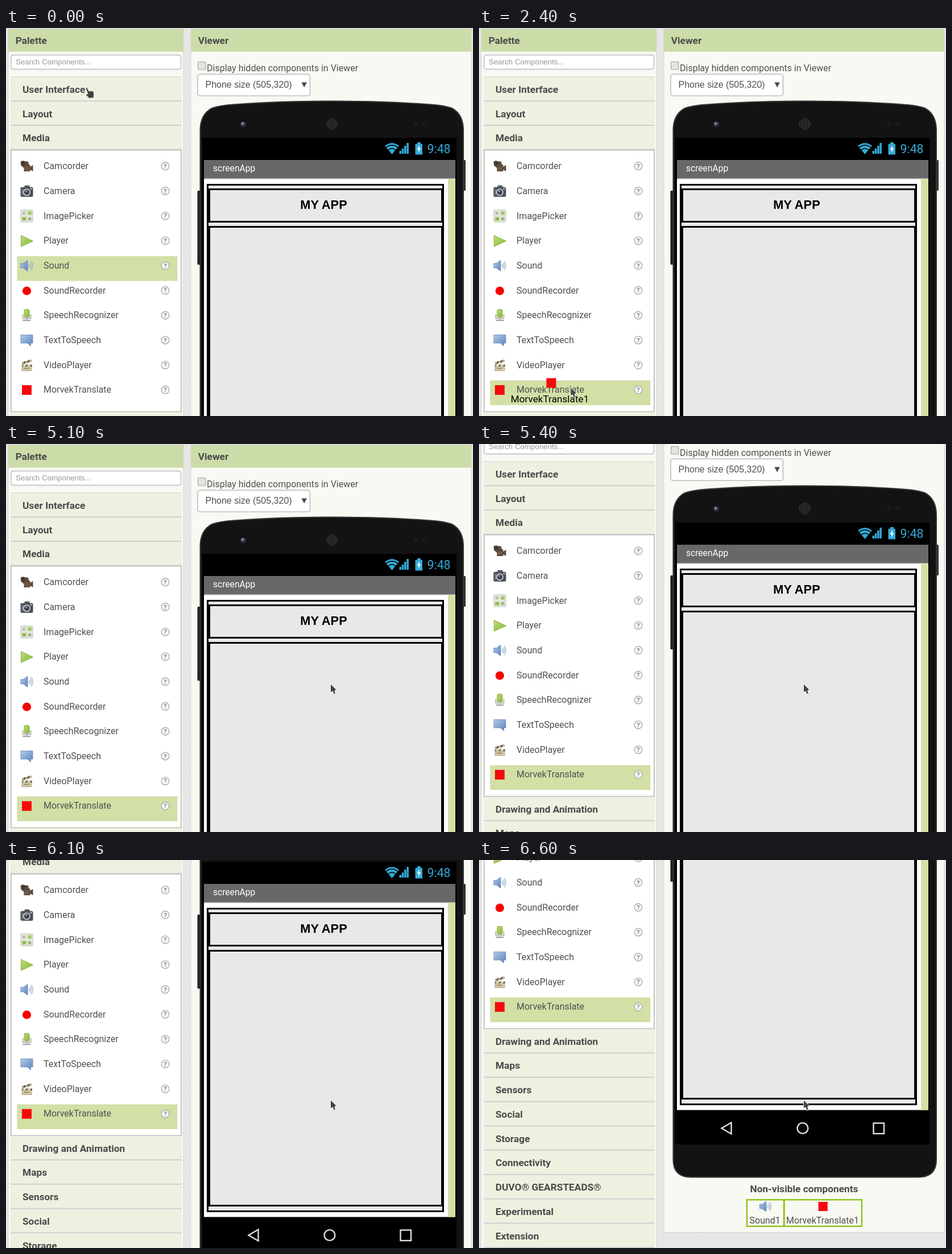
Write an HTML page that moves like this. It is 821 px wide and 682 px high and loops after 8300 ms.

```html
<!DOCTYPE html>
<html lang="en">
<head>
<meta charset="utf-8">
<title>Component palette</title>
<style>
html, body { margin: 0; width: 100%; height: 100%; overflow: hidden; background: #e6e6e6; }
svg { display: block; width: 821px; height: 682px; }
text { font: 16px Roboto, sans-serif; fill: #505050; white-space: pre; }
.bold { font-weight: 700; font-size: 17.3px; fill: #4a4a4a; }
.arial { font-family: "Liberation Sans", Arial, sans-serif; }
.mid { text-anchor: middle; }
</style>
</head>
<body>
<svg id="stage" viewBox="0 0 821 682" xmlns="http://www.w3.org/2000/svg"></svg>
<script>
const LOOP = 8300;
const BRAND = "MorvekTranslate";
const ROW = 43.7, HEAD = 42.75;

const box = (x, y, w, h, fill, more = "") =>
  `<rect x="${x}" y="${y}" width="${w}" height="${h}" fill="${fill}" ${more}/>`;
const path = (d, fill, more = "") => `<path d="${d}" fill="${fill}" ${more}/>`;
const dot = (x, y, r, fill, more = "") => `<circle cx="${x}" cy="${y}" r="${r}" fill="${fill}" ${more}/>`;
const label = (x, y, s, cls = "", style = "") =>
  `<text x="${x}" y="${y}" class="${cls}" style="${style}">${s}</text>`;
const at = (x, y, body, id = "") =>
  `<g ${id && `id="${id}"`} transform="translate(${x} ${y})">${body}</g>`;
const line = (color, width) => `stroke="${color}" stroke-width="${width}"`;

// Icons are centred on 0,0
const icons = {
  Camcorder:
    path("M-11 -8Q-8 -11 -4 -9L3 -8V-4L6 -2V1L11 -2V9L6 6V9H-5V3L-10 -1Z", "#5b4a3d") +
    dot(-6, -5, 3, "#43362c") + box(-4, 1, 8, 6, "#6d5a4a"),
  Camera:
    path("M-5 -7L-3 -10H4L6 -7Z", "#4b5057") + box(-11, -7, 22, 17, "#4a4e54", 'rx="2.5"') +
    box(-9, -4, 3, 11, "#777c82") + dot(0, 2, 6.5, "#c9cdd1") + dot(0, 2, 4.7, "#39424f") +
    dot(-1, 0, 1.8, "#8da3bd") + box(6, -5, 3, 2, "#ddd"),
  ImagePicker:
    box(-10.5, -10.5, 21, 21, "#e3e7dd", 'rx="1" ' + line("#bcc2b4", 1)) +
    box(2, -8, 6.5, 6, "#a4ca63") + box(-8, 2, 7, 6, "#8fbd4d") + box(2, 2, 6.5, 6, "#c4cdb9") +
    dot(-5, -5, 2.6, "#b5bdac") + dot(5, 5, 2, "#8aa863"),
  Player: path("M-10 -9.5L11 .5L-10 10Z", "url(#lime)", line("#8bb53c", 1)),
  Sound:
    path("M-10.5 -4H-6L1.5 -9.5V9.5L-6 4H-10.5Z", "url(#blue)", line("#6d8db8", 1)) +
    path("M4 -3Q6 0 4 3M6 -5.5Q9.5 0 6 5.5M8 -8Q13 0 8 8", "none", line("#9badc8", 1.3)),
  SoundRecorder: dot(0, .5, 7.6, "#f80000"),
  SpeechRecognizer:
    path("M-7 -2V5H7V-2M0 5V9", "none", line("#b4b4b4", 2)) + box(-7, 7.5, 14, 2.5, "#aaa") +
    box(-4.5, -10.5, 9, 13.5, "url(#lime)", 'rx="2" ' + line("#81a93b", 1)),
  TextToSpeech: path("M-10.5 -9.5H10.5V5H7V10L1 5H-10.5Z", "url(#blue)", line("#6585b5", .8)),
  VideoPlayer:
    path("M-9 -5L8 -10L9 -6L-8 -1Z", "#b9ae8d") + path("M-5 -6L-2 -7L-3 -3L-6 -2ZM2 -8L5 -9L4 -5L1 -4Z", "#5d5541") +
    box(-8.5, -1, 18, 3.5, "#756b53") + path("M-5 -1H-1L-3 2.5H-7ZM3 -1H7L5 2.5H1Z", "#eee6cc") +
    box(-8.5, 2.5, 17, 7.5, "#d3c9a7", line("#a39a7c", .8)) + box(-5, 5, 9, 1.5, "#8b8063"),
};
icons[BRAND] = box(-8.5, -8.5, 17, 17, "#f5090d");

const names = Object.keys(icons);
const help = dot(0, 0, 6.8, "#fbfbfb", line("#ababab", 1.4)) +
  label(0, 4, "?", "mid", "font-size:11px;font-weight:700;fill:#858585");

const category = (name, y) =>
  box(8, y - 21, 301, 41, "#edf1e0") + box(8, y + 19.8, 301, 3, "#cfcfcf") +
  label(29, y + 6.3, name, "bold");

const panel = (x, w, h, title) =>
  box(x, 1.5, w, h, "#f8f9f3", line("#d6d6d4", 1)) + box(x, 2, w, 39.5, "#ccdca8") +
  label(x + 12.7, 28, title, "bold");

function palette() {
  const top = ["User Interface", "Layout", "Media"];
  const rest = ["Drawing and Animation", "Maps", "Sensors", "Social", "Storage",
    "Connectivity", "DUVO® GEARSTEADS®", "Experimental", "Extension", "Other"];
  const rows = names.map((n, i) => {
    const y = 242.5 + ROW * i;
    return at(36.5, y + .5, icons[n]) + label(66, y + 5.6, n) + at(280, y + .3, help);
  }).join("");
  return panel(4, 308, 1100, "Palette") +
    box(9, 47.5, 298.5, 25, "#fff", 'rx="4" ' + line("#c9c9c9", 1.8)) +
    label(17, 64, "Search Components...", "arial", "font-size:13.33px;fill:#969696") +
    box(8, 85.5, 301, 1.5, "#d2d2d2") +
    top.map((n, i) => category(n, 107.5 + HEAD * i)).join("") +
    box(9, 214.5, 299, 460, "#fff", line("#bebebe", 1.8)) +
    box(19.5, 0, 282, 43.5, "#d2e0a6", 'id="hover"') + rows +
    rest.map((n, i) => category(n, 696.3 + HEAD * i)).join("");
}

function statusBar() {
  const blue = "#35a9d6";
  const bars = [5, 9, 14, 19].map((h, i) => box(691.5 + i * 4.3, 221 - h, 3.5, h, blue)).join("");
  return path("M666 207Q678.5 197.5 691 207L678.5 222Z", blue) +
    path("M668 210Q678.5 202 689 210M672 214.5Q678.5 209 685 214.5", "none", line("#000", 1.3)) + bars +
    path("M719.5 204H723V201H729V204H732V222.5H719.5Z", blue) +
    path("M727 206L722.5 213.5H725.5L724.5 220L729.5 211.5H726.5Z", "#fff") +
    label(740.5, 220, "9:48", "", `font-size:21.3px;fill:${blue}`);
}

function phone() {
  const frame = (x, y, w, h) => box(x + 1.5, y + 1.5, w - 3, h - 3, "#e8e8e8", line("#000", 3));
  let grille = "";
  for (let x = -9; x <= 9; x += 3)
    for (let y = -9; y <= 9; y += 3)
      if (x * x + y * y < 95) grille += dot(573 + x, 168.5 + y, 1, "#4c4c4c");
  return box(336.5, 286, 6, 130, "#202020", 'rx="1.5"') + box(802, 232, 6, 54, "#333", 'rx="1.5"') +
    path("M341.5 180Q341.5 152 362 141Q376 136 400 134.5Q480 128.5 573 128.5T746 134.5Q770 136 784 141" +
      "Q804 152 804 180V905Q804 935.5 772 935.5H373Q341.5 935.5 341.5 905Z", "#131313", line("#343434", 2)) +
    dot(417, 169, 5.5, "#23282e") + dot(416.5, 168.5, 3, "#52606f") + dot(415.5, 167.5, 1.2, "#b5c4d2") +
    grille + dot(720, 168, 3, "#1f1a1a") + dot(735, 168, 3, "#1f1a1a") +
    box(345, 193, 447, 685, "#000") + statusBar() +
    box(348, 232, 442, 33, "#686868") + label(364, 251.5, "screenApp", "", "font-size:15.6px;fill:#fff") +
    box(348, 265, 442, 552.5, "#fff") + box(348, 264, 442, 1.5, "#a5a5a5") + box(777, 265, 13, 552.5, "#d3e0a6") +
    frame(353, 274, 417, 535) + frame(356, 282, 412, 60) + frame(356, 348, 412, 451) +
    label(558.5, 318, "MY APP", "arial mid", "font-size:21.8px;font-weight:700;fill:#000") +
    `<g fill="none" stroke="#e0e0e0" stroke-width="2.4"><path d="M443.5 839.5V859.5L426.5 849.5Z"/>
    <circle cx="569" cy="849.5" r="9.4"/><rect x="693.5" y="840.5" width="18.5" height="18.5"/></g>`;
}

function viewer() {
  const chip = (x, w, name, icon) =>
    box(x, 975.2, w, 46.6, "none", line("#8fc31f", 2.5)) +
    at(x + w / 2, 987, `<g transform="scale(.95)">${icons[icon]}</g>`) +
    label(x + w / 2 - .8, 1017.3, name, "mid");
  return panel(325, 493, 1031, "Viewer") +
    box(337.5, 59.5, 13.5, 13.5, "#e4e4e4", 'rx="1.5" ' + line("#a2a2a2", 1.2)) +
    label(353, 75.7, "Display hidden components in Viewer") +
    box(337, 81.3, 197.5, 38, "#fff", 'rx="4" ' + line("#bdbdbd", 1.6)) +
    label(350.5, 105.3, "Phone size (505,320)", "arial") + path("M519.5 95.5H529L524.2 104.5Z", "#4a4a4a") +
    phone() + label(571.5, 962.4, "Non-visible components", "bold mid") +
    chip(471, 65, "Sound1", "Sound") + chip(536.5, 136.5, BRAND + "1", BRAND);
}

const grad = (id, a, b) =>
  `<linearGradient id="${id}" x2="1" y2="1"><stop stop-color="${a}"/><stop offset="1" stop-color="${b}"/></linearGradient>`;
const outline = 'stroke="#f4f4f4" stroke-width="1" stroke-linejoin="round"';

document.getElementById("stage").innerHTML =
  `<defs>${grad("lime", "#bedd7c", "#86b933")}${grad("blue", "#b2cbea", "#5a83bd")}
  <pattern id="paper" width="6" height="6" patternUnits="userSpaceOnUse">${box(0, 0, 6, 6, "#e5e5e5")}
  ${box(0, 0, 2, 2, "#ebebeb")}${box(3, 3, 2, 2, "#ebebeb")}</pattern></defs>` +
  `<g id="page">${box(0, 0, 821, 1100, "url(#paper)")}${palette()}${viewer()}</g>` +
  at(0, 0, icons[BRAND] + label(-2.5, 33.8, BRAND + "1", "mid", "font-size:17.2px;fill:#000"), "drag") +
  at(0, 0, path("M.8 1.2Q2.5 -.3 4 1.6L7 7L12 6.5Q15.5 7 15.7 10.5L15.2 18.8L7 19.6L2.2 14.5" +
    "Q1 12 3.2 11.5L5 12.2Z", "#424242", outline), "hand") +
  at(0, 0, path("M0 0V15.5L3.4 13L6.2 18.5L8.8 17.2L7.2 12L10.5 10.5Z", "#444", outline), "arrow");

const [page, hover, drag, hand, arrow] =
  ["page", "hover", "drag", "hand", "arrow"].map(id => document.getElementById(id));

// Last value whose start time has passed
const pick = (t, steps) => steps.reduce((v, [from, value]) => t >= from ? value : v, null);

function handPos(t) {
  const k = Math.floor(Math.min(t, 1300) / 100);
  if (k <= 9) {
    const u = k / 9, ease = u * u * (3 - 2 * u);
    return [139 - 37 * u + 28 * Math.sin(Math.PI * u), 104 + 502 * ease];
  }
  const u = 1 - (1 - (k - 9) / 4) ** 2;
  return [102 + 7 * u, 606 + 30 * u];
}

function place(el, pos) {
  el.setAttribute("display", pos ? "inline" : "none");
  if (pos) el.setAttribute("transform", `translate(${pos[0]} ${pos[1]})`);
}

function draw(t) {
  const scroll = pick(t, [[0, 0], [5400, 55], [5600, 100], [5800, 145], [6100, 190], [6400, 290], [6600, 378]]);
  place(page, [0, -scroll]);
  hover.setAttribute("y", 401 + (t < 1600 ? 0 : 5 * ROW));
  place(hand, t < 2300 ? handPos(t) : null);
  place(arrow, pick(t, [[2300, [127, 637]], [2400, [161, 631.5]], [4000, [561, 427.5]],
    [5000, [566, 424]], [5100, [570.5, 421.5]]]));
  place(drag, pick(t, [[2300, [127, 624]], [4000, [561, 415]], [4700, null]]));
}

const start = performance.now();
function tick() {
  draw((performance.now() - start) % LOOP);
  requestAnimationFrame(tick);
}
tick();
</script>
</body>
</html>
```
